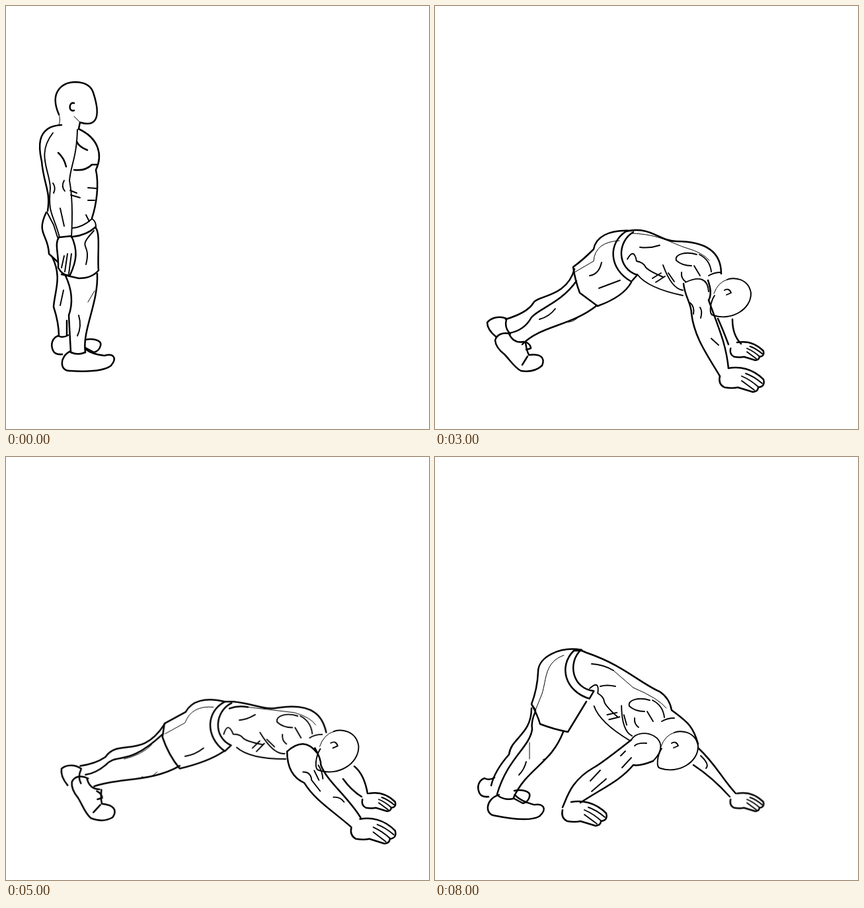
These frames come from a looping animation (640 px wide and 640 px high, 9000 ms). An HTML page without scripts:

```html
<!DOCTYPE html>
<html lang="en">
<head>
<meta charset="utf-8">
<title>Walk-out exercise</title>
<style>
html, body { margin: 0; width: 100%; height: 100%; overflow: hidden; background: #fff; }
svg { display: block; width: 100vw; height: 100vh; }
path { fill: none; stroke: #000; stroke-width: 2.5; stroke-linecap: round; stroke-linejoin: round; vector-effect: non-scaling-stroke; }
.m { stroke-width: 1.9; }
.t { stroke-width: 1; }
.pose { opacity: 0; animation: 9s step-end infinite; }
#stand { animation-name: stand; }
#bend { animation-name: bend; }
#pike { animation-name: pike; }
#walk { animation-name: walk; }
#reach { animation-name: reach; }
#plank { animation-name: plank; }
@keyframes stand { 0% { opacity: 1; } 11.111%, 100% { opacity: 0; } }
@keyframes bend { 0%, 22.222%, 100% { opacity: 0; } 11.111% { opacity: 1; } }
@keyframes pike { 0%, 33.333%, 100% { opacity: 0; } 22.222%, 88.889% { opacity: 1; } }
@keyframes walk { 0%, 44.444%, 88.889%, 100% { opacity: 0; } 33.333%, 77.778% { opacity: 1; } }
@keyframes reach { 0%, 55.556%, 77.778%, 100% { opacity: 0; } 44.444%, 66.667% { opacity: 1; } }
@keyframes plank { 0%, 66.667%, 100% { opacity: 0; } 55.556% { opacity: 1; } }
</style>
</head>
<body>
<svg viewBox="0 0 640 640">
<defs>
  <!-- shared body parts -->
  <g id="head">
    <path class="m" d="M343 441C336 452 334 470 341 471C368 480 399 462 398 437C394 414 370 413 362 417M358 433Q365 429 368 437L361 440"/>
    <path class="t" d="M362 417Q348 421 342 438"/>
  </g>
  <g id="hand">
    <path d="M431 560Q428 572 438 577Q450 579 458 577L481 584Q489 583 489 577Q500 576 497 565C480 548 460 545 444 548"/>
    <path class="m" d="M464 560Q478 566 490 577M464 567L483 581M470 556Q482 560 495 571"/>
  </g>
  <use id="farHand" href="#hand" transform="translate(124 98) scale(.75)"/>
  <path id="band" d="M0 0C-28 18 -26 57 8 76L17 66C-14 56 -14 16 11 1"/>
  <path id="blades" class="m" d="M396 376C380 371 362 375 365 385Q374 393 388 393M400 376Q416 384 418 402M392 393L401 408M373 403Q372 412 379 417M414 408Q422 403 433 403"/>
  <path id="abs" class="m" d="M306 406Q322 427 375 438M291 383Q301 365 305 386Q315 388 318 394T345 410M329 412L342 404M334 418L348 409M345 392Q358 428 375 430M353 404L362 417"/>
  <path id="flatShoe" d="M98 522C80 530 81 553 97 552Q145 555 159 544C169 532 162 525 149 529Q130 527 120 519M98 524Q109 529 120 524"/>
  <path id="heel" d="M79 499C70 502 67 512 71 521Q74 528 85 527M79 499Q86 503 94 498"/>
  <path id="toe" d="M120 505C128 503 146 504 143 514Q141 522 133 524L120 517"/>
  <path id="tiltShoe" d="M114 496C103 493 93 497 91 506Q92 517 105 527C113 535 120 547 130 552Q150 555 162 544C167 532 160 526 142 528Q138 520 137 508M112 496Q119 511 134 508M140 530L132 543"/>
  <path id="tiltHeel" d="M108 473C97 468 84 472 79 479Q79 490 93 501M108 474Q105 486 112 494"/>
  <path id="tiltToe" d="M137 508Q145 512 145 518L138 520"/>

  <g id="legs">
    <path d="M70 380C85 410 74 430 72 455Q80 480 80 499M90 408Q105 440 95 468L98 524M138 405C140 450 115 490 120 524M92 476V498"/>
    <path class="m" d="M87 430L82 453M110 468Q115 485 108 499"/>
    <path class="t" d="M134 431L124 448"/>
    <use href="#heel"/>
    <use href="#toe"/>
    <use href="#flatShoe"/>
  </g>

  <!-- stretched body without its far arm -->
  <g id="long">
    <path d="M330 377C300 370 280 376 271 392L239 409L236 429Q245 455 262 475Q305 465 328 450M330 377H343C375 380 390 390 410 386C465 378 478 400 483 422M337 387Q350 382 365 385"/>
    <use href="#band" transform="translate(330 377) rotate(6) scale(.95)"/>
    <path class="t" d="M240 424L270 408Q280 382 313 385M365 385L435 393Q460 400 467 411M228 480Q215 492 205 487M178 461Q205 455 220 440"/>
    <path class="m" d="M270 457Q285 455 298 445M352 404Q362 404 376 396"/>
    <use href="#blades" x="44" y="22"/>
    <use href="#abs" transform="translate(337 431) rotate(-12) translate(-298 -391)"/>
    <path d="M424 450Q424 485 450 496C465 520 490 535 520 560M466 445Q475 460 475 470C485 495 515 515 535 547M424 450Q450 427 469 452"/>
    <path class="m" d="M448 480Q460 480 461 492L474 508M465 478L472 492M471 470Q477 478 478 490M494 517Q504 516 510 524"/>
    <use href="#hand" x="90" y="1"/>
    <use href="#head" transform="translate(114 -17) scale(1.05)"/>
    <path d="M239 410C205 462 170 430 150 458Q135 468 112 471M237 424C180 475 170 450 150 470Q135 482 120 484M262 471C220 495 170 488 133 501"/>
    <use href="#tiltHeel" transform="rotate(12 100 500)"/>
    <use href="#tiltToe"/>
    <use href="#tiltShoe" transform="rotate(12 150 540)"/>
  </g>
</defs>

<g id="stand" class="pose">
  <path d="M80 164C65 130 85 115 106 115Q127 116 132 131C147 177 130 182 112 176L110 186M103 147C95 144 94 161 103 158"/>
  <path class="t" d="M80 164Q83 172 80 180M112 176L103 167"/>
  <path d="M84 180C40 182 52 225 54 235C57 270 68 280 63 310M110 186C140 200 147 225 136 248C141 270 137 300 130 321M103 248Q120 250 130 240L138 240M79 222Q88 230 91 243M107 205Q110 213 123 218"/>
  <path class="m" d="M71 192C45 225 67 250 67 276C63 315 72 315 81 350M108 187C107 230 98 240 96 264Q102 295 99 350M71 268Q76 275 72 283M88 264Q83 273 89 280M124 275L137 276M124 294H134M97 279L107 283M98 286L112 290M82 306L88 333M121 316L126 326"/>
  <path d="M101 349Q122 347 136 334M136 336C143 345 138 380 140 400Q130 412 110 412L84 406M61 312C45 345 64 345 65 375L78 387"/>
  <path class="m" d="M100 336Q116 335 130 322Q136 325 136 334M62 312L72 331L78 350M133 340C105 370 130 355 121 391M88 378L84 396M93 375L89 402M99 375L95 405"/>
  <path d="M80 350C73 360 80 375 79 396Q86 409 97 407C107 385 109 370 99 348L80 350"/>
  <use href="#legs"/>
</g>

<g id="bend" class="pose">
  <path d="M146 282C95 270 50 310 54 350L68 398Q100 414 136 408L149 369M146 282C190 290 234 360 238 412M157 364L172 402C165 430 185 460 193 530M172 402Q205 385 210 425C203 460 206 490 219 523"/>
  <use href="#band" transform="translate(134 281) rotate(-4) scale(1.15)"/>
  <path class="m" d="M168 335H190M164 368Q176 374 178 386M184 452L188 476M228 473L232 522M244 472L246 510L264 522"/>
  <use href="#blades" x="-196" y="-22"/>
  <use href="#head" x="-130" y="-3"/>
  <use href="#hand" x="-238" y="-26"/>
  <use href="#legs"/>
</g>

<g id="pike" class="pose">
  <path d="M222 292C190 286 156 302 156 325Q155 350 146 374Q155 390 159 404Q180 412 201 416L229 370M146 374L152 383M210 293H222L229 296C285 315 310 342 340 355Q355 365 358 383C380 400 390 405 398 434"/>
  <use href="#band" transform="translate(210 293) rotate(-12)"/>
  <path class="t" d="M195 300C166 310 169 335 162 358L152 383M270 323L300 349Q338 365 350 380M180 441Q175 455 163 458M143 432V457"/>
  <path class="m" d="M237 313Q255 314 270 323M250 347Q260 344 273 347"/>
  <use href="#blades" x="-71" y="-8"/>
  <use href="#abs" transform="translate(238 360) rotate(19) translate(-298 -391)"/>
  <path d="M297 428Q250 465 240 470C205 490 200 515 193 530M330 460Q310 468 300 466C280 490 255 500 220 523M398 440C425 465 433 485 455 509M391 466Q420 485 446 514"/>
  <path class="m" d="M297 428C310 405 365 425 330 460M302 437Q306 432 320 433M281 452L288 445M283 470L297 455M250 474L235 490M259 487L237 506M402 452Q416 465 410 471M138 461Q135 473 127 481"/>
  <use href="#hand" x="-238" y="-26"/>
  <use href="#farHand"/>
  <use href="#head"/>
  <path d="M146 380C146 420 115 425 112 450Q90 475 85 497M152 385Q145 400 147 412C143 440 110 455 94 510M194 416C175 465 140 470 119 515"/>
  <use href="#heel" x="-4" y="-13"/>
  <use href="#toe"/>
  <use href="#flatShoe" transform="translate(164 540) rotate(8) scale(1.07) translate(-164 -540)"/>
</g>

<g id="walk" class="pose">
  <path d="M297 340C262 338 243 350 240 368Q224 384 209 395Q212 415 219 434L246 454Q285 440 297 418M289 341C325 332 340 356 365 356Q433 356 433 405"/>
  <use href="#band" x="289" y="341"/>
  <path class="t" d="M211 403L240 386Q242 357 279 355M297 344C340 345 360 360 380 366Q405 373 415 385M218 470Q208 480 198 478"/>
  <path class="m" d="M234 408Q248 406 252 388M248 427L280 415M310 365Q325 367 340 362"/>
  <use href="#blades"/>
  <use href="#abs"/>
  <path d="M376 420C378 440 388 450 388 465C392 500 410 525 431 560M413 415Q420 435 414 445C430 490 440 510 444 548M428 473Q435 488 444 512M450 474Q450 498 463 511"/>
  <path class="m" d="M379 418Q412 403 414 432M386 449Q393 455 391 466M401 456Q405 462 402 472M418 503L429 513"/>
  <use href="#hand"/>
  <use href="#farHand"/>
  <use href="#head" x="80" y="-3"/>
  <path d="M211 398C200 440 155 438 149 449Q140 464 107 474M214 416C190 450 158 457 146 471Q135 491 112 495M245 453C205 485 160 483 132 512"/>
  <path class="m" d="M182 458Q173 470 158 474"/>
  <use href="#tiltHeel"/>
  <use href="#tiltToe"/>
  <use href="#tiltShoe"/>
</g>

<g id="reach" class="pose">
  <use href="#long"/>
  <path class="m" d="M427 465Q426 475 432 484Q443 495 447 512Q455 530 468 531M450 497Q462 507 463 517Q476 531 470 532L460 524"/>
</g>

<g id="plank" class="pose">
  <use href="#long" transform="matrix(1.003 0 0 1.033 0 -19.3)"/>
  <path d="M527 468Q542 480 547 509M510 487Q522 504 538 514"/>
  <use href="#farHand" x="92"/>
</g>
</svg>
</body>
</html>
```
